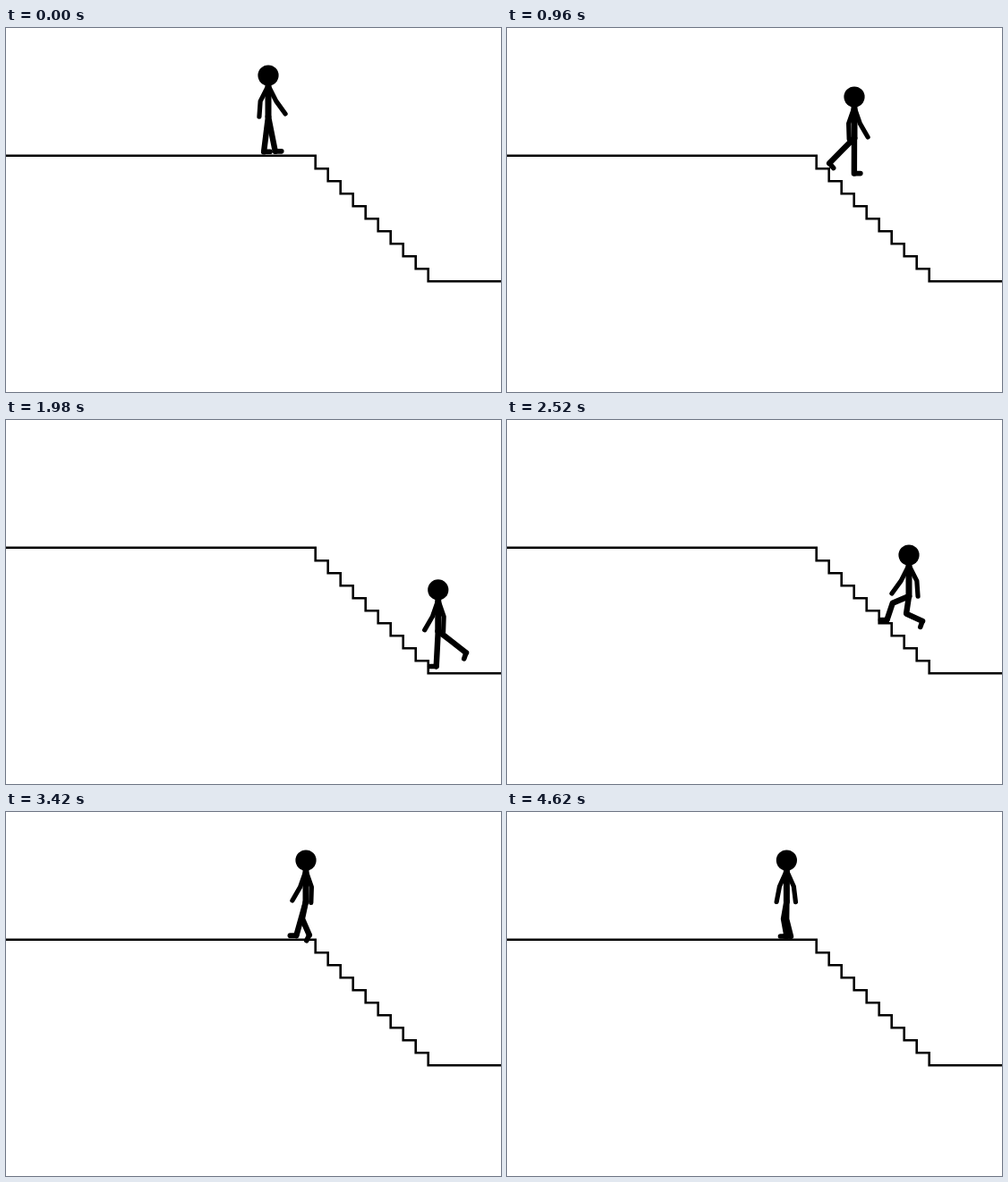
Recreate the animation shown at these times as an HTML page with a canvas. Size 553 by 407 pixels, loop 4680 ms.

```html
<!DOCTYPE html>
<html lang="en">
<head>
<meta charset="utf-8">
<title>Stairs</title>
<style>
  html, body { margin: 0; width: 100%; height: 100%; overflow: hidden; background: #fff; }
  canvas { display: block; }
</style>
</head>
<body>
<canvas id="stage" width="553" height="407"></canvas>
<script>
const ctx = document.getElementById('stage').getContext('2d');
const LOOP = 4680, TICK = 60;
const EDGE = 345.7, TOP = 142.7, STEP = 14, STEPS = 10;
const UPPER_ARM = 19.5, FOREARM = 17.4, LEG = 19.8, FOOT = 7;
const SWING = 215, ARM_BEAT = 240;

// Head centre: time, x, y
const body = [
  [300, 293, 53], [660, 342, 53], [960, 388, 77], [1140, 434, 138], [1290, 500, 193],
  [1380, 545, 194], [1500, 562, 193], [1920, 486, 193], [2460, 457, 165], [2520, 449, 151],
  [3000, 389, 109], [3120, 373, 83], [3420, 335, 54], [3600, 312.4, 54]
];

// Footfalls: landing time, x; the feet take turns
const down = [
  [0, 288], [0, 301], [520, 326], [740, 356], [1000, 394],
  [1150, 424], [1260, 488], [1360, 530], [1460, 575]
];
const up = [];
for (let i = -2; i < 8; i++) {
  up.push([Math.min(1860 + 270 * i, 3600), Math.max(480.5 - 28 * i, i % 2 ? 317 : 310)]);
}

// Upper and lower angles of both arms, degrees from straight down
const rest = [-24, -11, 24, 7], ponder = [-102, -206, 19, 3], shrug = [-55, -110, 20, 125];
const gestures = [
  [3660, ...rest], [3840, ...ponder], [4080, ...ponder],
  [4260, ...shrug], [4500, ...shrug], [4620, ...rest]
];

const rad = deg => deg * Math.PI / 180;
const mix = (a, b, f) => a + (b - a) * f;

function sample(keys, t) {
  const i = keys.findIndex(k => k[0] > t);
  if (i === 0) return keys[0].slice(1);
  if (i < 0) return keys[keys.length - 1].slice(1);
  const a = keys[i - 1], b = keys[i];
  const f = (t - a[0]) / (b[0] - a[0]);
  return a.slice(1).map((v, n) => mix(v, b[n + 1], f));
}

function ground(x) {
  const k = Math.min(Math.max(Math.floor((x - EDGE) / STEP) + 1, 0), STEPS);
  return k ? TOP + 0.5 + STEP * k : TOP;
}

// Ankle position and toe pitch of one foot
function foot(falls, side, t) {
  const own = falls.filter((_, i) => i % 2 === side);
  let n = own.findIndex(f => f[0] > t);
  if (n < 0) n = own.length - 1;
  const from = own[Math.max(n - 1, 0)][1], to = own[n][1];
  const p = Math.min(Math.max((t - own[n][0]) / SWING + 1, 0), 1);
  const y0 = ground(from) - 3.7, y1 = ground(to) - 3.7;
  const kick = Math.max(0, Math.sin(2 * Math.PI * p));
  const ease = p * p * (3 - 2 * p) - (y1 < y0 ? 0.45 * kick : 0);
  const rise = Math.pow(p, y1 > y0 ? 2.4 : 0.7);
  return [mix(from, to, ease), mix(y0, y1, rise) - 3 * Math.sin(Math.PI * p), 75 * kick];
}

function armAngles(t, face) {
  if (t >= 3600) return sample(gestures, t);
  const s = Math.cos(Math.PI * (Math.max(t, 300) - (face > 0 ? 300 : 2520)) / ARM_BEAT);
  return [-s, s].flatMap(v => [face * 27 * v, face * (16 + 20 * v)]);
}

function stroke(points, width) {
  ctx.lineWidth = width;
  ctx.beginPath();
  points.forEach(p => ctx.lineTo(p[0], p[1]));
  ctx.stroke();
}

function drawStairs() {
  const pts = [[-5, TOP]];
  for (let i = 0; i < STEPS; i++) {
    const x = EDGE + STEP * i;
    pts.push([x, ground(x - 1)], [x, ground(x + 1)]);
  }
  pts.push([560, ground(560)]);
  ctx.lineCap = 'butt';
  ctx.lineJoin = 'miter';
  stroke(pts, 2.6);
}

function drawArm(x, y, upper, lower) {
  const ex = x + UPPER_ARM * Math.sin(rad(upper)), ey = y + UPPER_ARM * Math.cos(rad(upper));
  const hx = ex + FOREARM * Math.sin(rad(lower)), hy = ey + FOREARM * Math.cos(rad(lower));
  stroke([[x, y], [ex, ey], [hx, hy]], 5.2);
}

// Two equal bones: the knee bends towards the facing side
function drawLeg(x, y, [ax, ay, pitch], face) {
  const dist = Math.hypot(ax - x, ay - y) || 1;
  const ux = (ax - x) / dist, uy = (ay - y) / dist;
  const half = Math.min(dist / 2, LEG);
  const bend = Math.sqrt(LEG * LEG - half * half) * face;
  const knee = [x + ux * half + uy * bend, y + uy * half - ux * bend];
  const ankle = [x + ux * half * 2, y + uy * half * 2];
  const toe = [ankle[0] + face * FOOT * Math.cos(rad(pitch)), ankle[1] + FOOT * Math.sin(rad(pitch))];
  stroke([[x, y], knee, ankle], 6.4);
  stroke([ankle, toe], 5.6);
}

function drawFigure(t) {
  const [x, y] = sample(body, t);
  const goingDown = t < 1500;
  const face = goingDown ? 1 : -1, falls = goingDown ? down : up;
  const neck = y + 11.5, hip = y + 46;
  const [lu, ll, ru, rl] = armAngles(t, face);
  ctx.lineCap = ctx.lineJoin = 'round';
  ctx.beginPath();
  ctx.arc(x, y, 11.6, 0, Math.PI * 2);
  ctx.fill();
  stroke([[x, neck], [x, hip]], 7);
  drawArm(x, neck, lu, ll);
  drawArm(x, neck, ru, rl);
  for (const side of [0, 1]) drawLeg(x, hip, foot(falls, side, t), face);
}

function render(now) {
  const t = Math.floor((now % LOOP) / TICK) * TICK;
  ctx.fillStyle = '#fff';
  ctx.fillRect(0, 0, 553, 407);
  ctx.fillStyle = ctx.strokeStyle = '#000';
  drawStairs();
  const away = t >= 1440 && t < 1560;
  if (!away) drawFigure(t);
}

const start = performance.now();
function loop() {
  render(performance.now() - start);
  requestAnimationFrame(loop);
}
loop();
</script>
</body>
</html>
```
